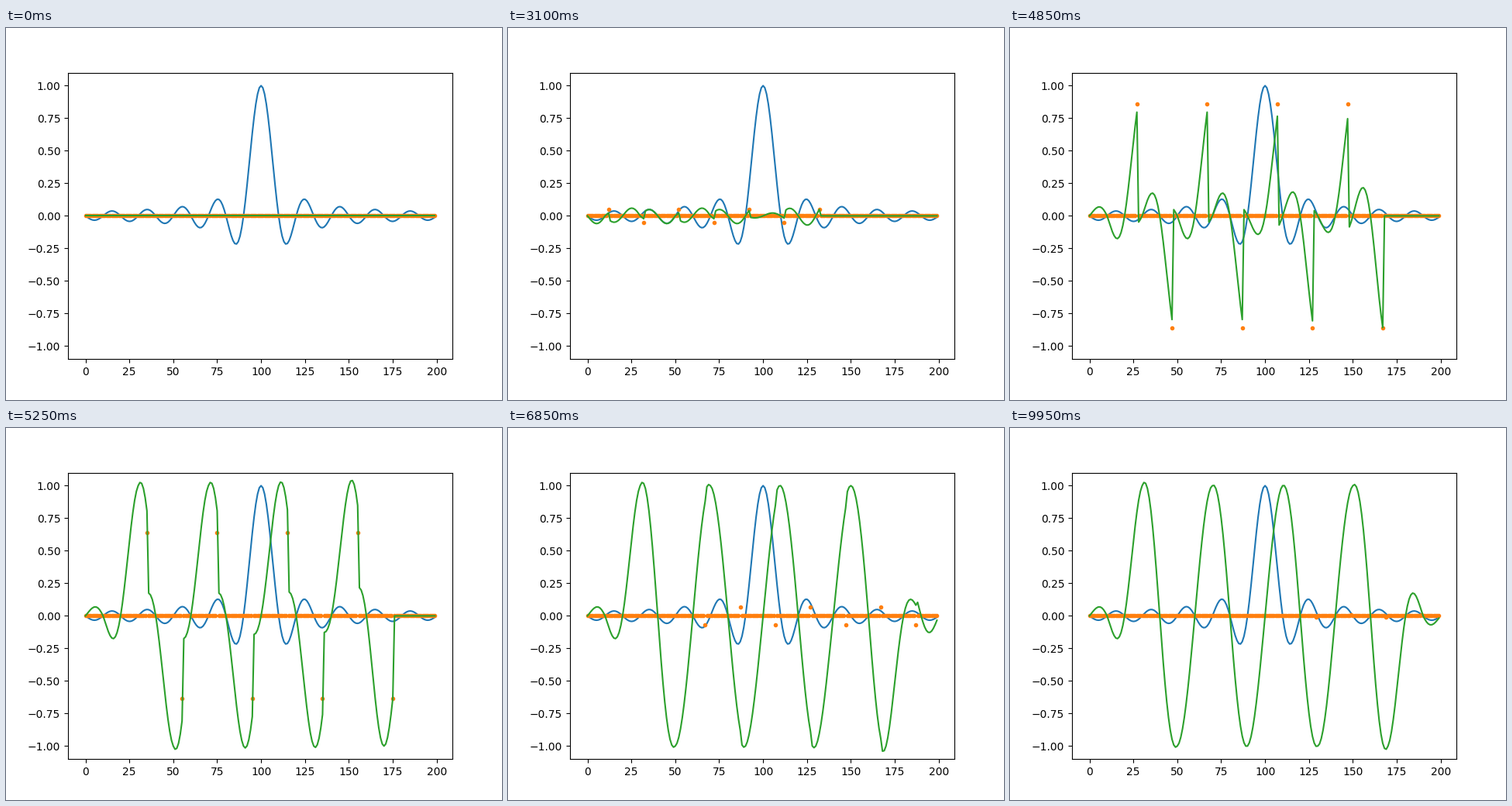
Recreate the animation shown at these times as a matplotlib script. Size 640x480 px, loop 10 s.

```python
import numpy as np
import matplotlib.pyplot as plt
from matplotlib.animation import FuncAnimation

N = 200
CENTER = 100
WIDTH = 10

x = np.arange(N)

# Eight pulses of alternating sign, spaced by two sinc widths
offsets = np.arange(-70, 71, 20)[:, None]
signs = np.where(np.arange(len(offsets)) % 2 == 0, 1, -1)[:, None]


def kernel(t):
    return np.sinc((t - CENTER) / WIDTH)


# Time at which each pulse passes each position, and its value there
passing = x - offsets
weights = signs * kernel(passing)


def masked_sum(mask):
    return np.where(mask, weights, 0).sum(axis=0)


fig, ax = plt.subplots(figsize=(6.4, 4.8), dpi=100)
ax.plot(x, kernel(x), "C0")
pulses, = ax.plot(x, np.zeros(N), "C1.")
trail, = ax.plot(x, np.zeros(N), "C2")
ax.set_ylim(-1.1, 1.1)


def update(t):
    pulses.set_ydata(masked_sum(passing == t))
    trail.set_ydata(masked_sum((passing >= 0) & (passing <= t)))
    return pulses, trail


anim = FuncAnimation(fig, update, frames=N, interval=50, repeat=True,
                     repeat_delay=0)
plt.show()
```
